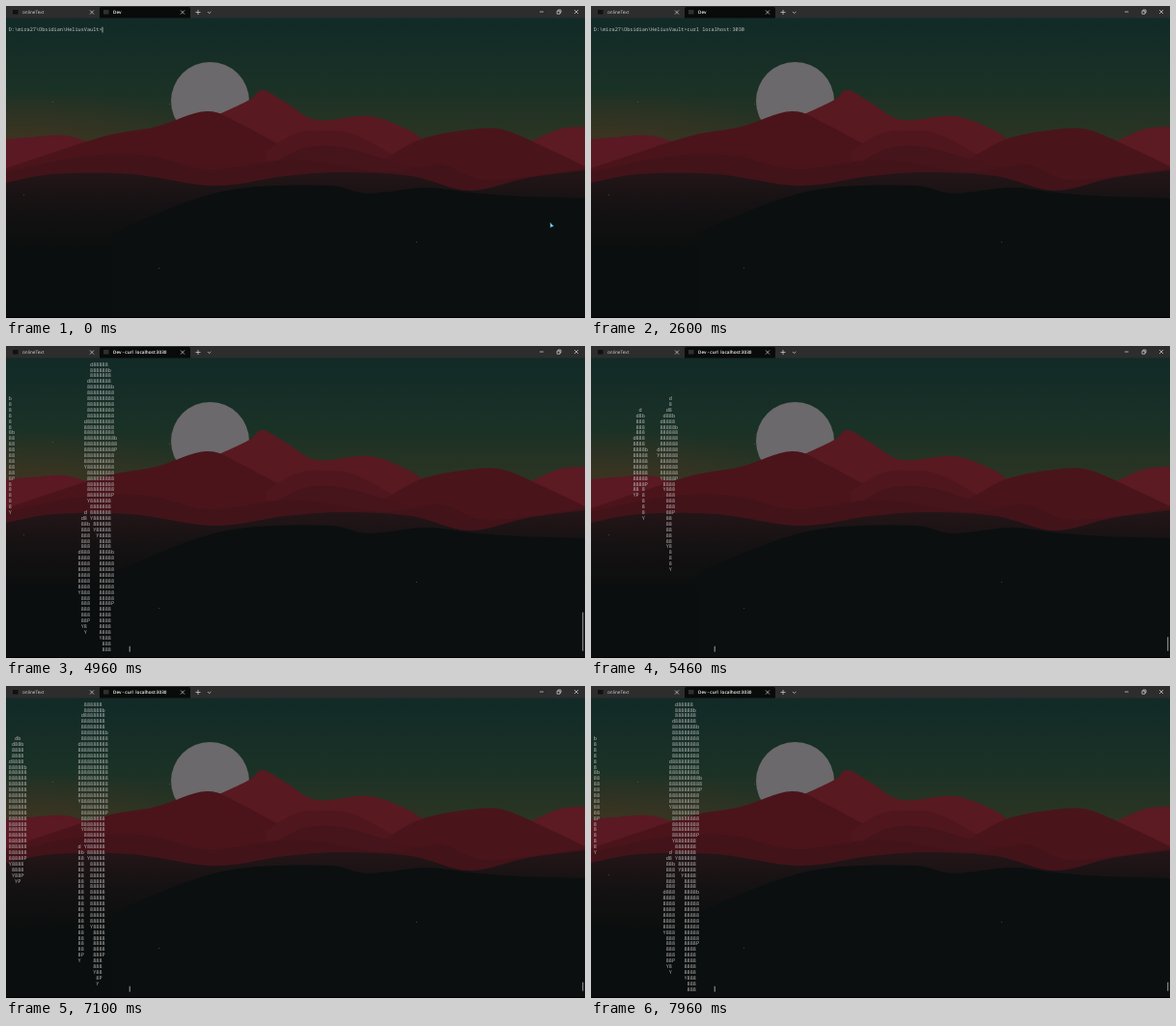
An HTML page that plays this animation: 600 by 323 pixels, repeating every 8000 ms.

```html
<!DOCTYPE html>
<html lang="en">
<head>
<meta charset="utf-8">
<title>Terminal</title>
<style>
  html, body { margin: 0; width: 100%; height: 100%; overflow: hidden; background: #0a0d0d; }
  svg { display: block; width: 100%; height: 100%; }
  text { white-space: pre; text-rendering: geometricPrecision; }
  .mono { font: 5.217px "Noto Sans Mono", "DejaVu Sans Mono", monospace; fill: #c6c6c6; }
  .art { fill: #b8b8b8; }
  .tab { font: 4.65px "Open Sans", "Noto Sans", sans-serif; fill: #d6d6d6; }
  .active { fill: #fff; font-weight: 600; }
  .icon { fill: none; stroke: #d8d8d8; stroke-width: .7; }
</style>
</head>
<body>
<svg viewBox="0 0 600 323" preserveAspectRatio="none">
  <defs>
    <linearGradient id="sky" x2="0" y2="1">
      <stop offset="0" stop-color="#122a27"/>
      <stop offset=".5" stop-color="#193126"/>
      <stop offset="1" stop-color="#2f3522"/>
    </linearGradient>
    <radialGradient id="glow" gradientUnits="userSpaceOnUse" cx="0" cy="0" r="1"
      gradientTransform="translate(15 142) scale(200 55)">
      <stop offset="0" stop-color="#4a3320" stop-opacity=".6"/>
      <stop offset="1" stop-color="#4a3320" stop-opacity="0"/>
    </radialGradient>
    <linearGradient id="earth" gradientUnits="userSpaceOnUse" x1="0" y1="173" x2="0" y2="250">
      <stop offset="0" stop-color="#231517"/>
      <stop offset=".4" stop-color="#161213"/>
      <stop offset="1" stop-color="#0b0e0e"/>
    </linearGradient>
  </defs>
  <rect y="12" width="600" height="138" fill="url(#sky)"/>
  <rect y="12" width="600" height="138" fill="url(#glow)"/>
  <circle cx="211.5" cy="98.5" r="40.5" fill="#6b696b"/>
  <g id="hills"></g>
  <g id="specks" fill="#8a7a66" opacity=".45"></g>
  <rect y="322" width="600" height="1" fill="#000"/>

  <rect width="600" height="12.5" fill="#2d2d2d"/>
  <path d="M97 12.5V2.5Q97 1 98.500 1H189.500Q191 1 191 2.500V12.500Z" fill="#090b0b"/>
  <rect x="7" y="4" width="5.500" height="4.500" fill="#111"/>
  <rect x="101" y="4" width="5.500" height="4.500" fill="#303030"/>
  <text class="tab" x="17" y="8">onlineText</text>
  <text class="tab active" id="title" x="111" y="8"></text>
  <path class="icon" d="M87 4.500l4 4m0-4l-4 4M181 4.500l4 4m0-4l-4 4M196.500 6.500h5m-2.500-2.500v5M209 6l1.700 1.500L212.400 6"/>
  <path class="icon" d="M553 6h4M571 5.200h3v3h-3zM572 5v-1h3v3h-1M589 4l4 4m0-4l-4 4"/>

  <text class="mono" id="prompt" x="2.800" y="26.400"></text>
  <g id="art"></g>
  <rect id="caret" width=".7" height="5.800" fill="#dedede"/>
  <rect id="scroll" x="597.300" width="1" fill="#a5a5a5"/>
  <path id="mouse" d="M564 224.500l.3 5 1.200-1.300 1.900-.2z" fill="#bdf0ff" stroke="#1b8fb5" stroke-width=".6"/>
</svg>
<script>
const $ = id => document.getElementById(id);
const NS = 'http://www.w3.org/2000/svg';
const LOOP = 8000, CELL_W = 3.13, ROW_H = 5.9, COLS = 40, ROWS = 51;
const LEFT = 2.8, TOP = 18.7;
const PROMPT = 'D:\\mira27\\Obsidian\\HeliusVault>';
const COMMAND = 'curl localhost:3030';
const TYPE_START = 600, TYPE_END = 2060, ENTER = 3600, STREAM = 4700, BLINK = 530;

function add(parent, tag, attrs) {
  const el = document.createElementNS(NS, tag);
  for (const k in attrs) el.setAttribute(k, attrs[k]);
  return parent.appendChild(el);
}

// A smooth curve through a few points, filled down to the bottom.
function ridge(fill, points) {
  const p = points.split(' ').map(s => s.split(',').map(Number));
  const at = i => p[Math.max(0, Math.min(p.length - 1, i))];
  const handle = (i, side) => at(i).map((v, n) => v + side * (at(i + 1)[n] - at(i - 1)[n]) / 6);
  let d = `M${p[0][0]},323L${p[0]}`;
  for (let i = 1; i < p.length; i++) d += `C${handle(i - 1, 1)} ${handle(i, -1)} ${p[i]}`;
  add($('hills'), 'path', { d: `${d}V323Z`, fill });
}

ridge('#5a1923', '0,138 25,136 60,134 90,143 140,165');
ridge('#5c1a23', '500,160 546,139 575,127 600,125');
ridge('#591921', '190,125 232,107 254,96 266,87 290,100 322,118 375,114 412,126 434,140 460,165');
ridge('#4b141b', '0,168 45,153 105,134 155,125 208,109 245,123 290,147 340,172');
ridge('#50161d', '270,150 300,132 330,129 366,135 430,172');
ridge('#4a141b', '390,160 430,138 480,128 515,128 560,147 600,166');
ridge('#46141b', '260,176 303,149 346,146 400,161 480,185');
ridge('#43131a', '0,172 78,156 148,155 212,169 300,159 390,172 450,164 500,180 600,168');
ridge('url(#earth)', '0,183 50,174 130,174 215,186 290,176 350,172 420,176 480,191 540,178 600,170');
ridge('#0b0f0f', '110,235 190,202 250,188 335,186 375,194 435,188 480,193 530,197 600,199');

for (const [x, y] of [[48, 99], [169, 101], [18, 195], [425, 244], [158, 271]])
  add($('specks'), 'rect', { x, y, width: 1, height: 1 });

// A pose is three solid ellipses and a hole, each [cx, cy, rx, ry].
const TWIN = [[51, 126, 7, 63], [81, 110, 11, 46], [82, 141, 4, 92], [50, 175, 2, 40]];
const NEAR = [[53, 128, 9, 62], [73, 108, 10, 34], [73, 128, 6, 68], [52, 178, 4, 36]];
const FULL = [[56, 205, 39, 155], [56, 40, 13, 70], [56, 40, 13, 70], [55, 185, 5, 62]];
const SIDE = [[3, 113, 5, 63], [98, 100, 16, 100], [104, 240, 7, 110], [82, 235, -6, 66]];
const DANCE = [TWIN, FULL, NEAR, SIDE, FULL, SIDE];
const BEAT = 500, DOWNBEAT = 5460, STEPS = 6;

const lines = Array.from({ length: ROWS }, (_, r) =>
  add($('art'), 'text', { class: 'mono art', x: LEFT, y: TOP + r * ROW_H + 1.9 }));

function poseAt(t) {
  const beat = (t - DOWNBEAT) / BEAT + DANCE.length, i = Math.floor(beat);
  const u = Math.floor((beat - i) * STEPS) / STEPS;
  const a = DANCE[i % DANCE.length], b = DANCE[(i + 1) % DANCE.length];
  return a.map((e, k) => e.map((v, n) => v + (b[k][n] - v) * u));
}

const within = ([cx, cy, rx, ry], x, y) => ((x - cx) / rx) ** 2 + ((y - cy) / ry) ** 2 < 1;

// A negative rx turns the hole into a fourth solid.
function solid(pose, col, row) {
  const x = LEFT + (col + .5) * CELL_W, y = TOP + row * ROW_H, last = pose[3];
  if (within(last, x, y)) return last[2] < 0;
  return pose.slice(0, 3).some(e => within(e, x, y));
}

function glyph(pose, c, r) {
  if (!solid(pose, c, r)) return ' ';
  const above = solid(pose, c, r - 1), below = solid(pose, c, r + 1);
  if (above && below) return '8';
  if (!solid(pose, c - 1, r)) return above ? 'Y' : 'd';
  if (!solid(pose, c + 1, r)) return above ? 'P' : 'b';
  return '8';
}

function drawArt(t) {
  const pose = t >= STREAM && poseAt(t);
  lines.forEach((el, r) => {
    el.textContent = pose ? Array.from({ length: COLS }, (_, c) => glyph(pose, c, r)).join('') : '';
  });
}

function draw(t) {
  const progress = (t - TYPE_START) / (TYPE_END - TYPE_START);
  const typed = progress < 0 ? 0 : Math.min(COMMAND.length, 1 + Math.floor(progress * (COMMAND.length - 1)));
  const streaming = t >= STREAM;
  $('title').textContent = t < ENTER ? 'Dev' : 'Dev - curl  localhost:3030';
  $('prompt').textContent = streaming ? '' : PROMPT + COMMAND.slice(0, typed);
  $('mouse').style.display = t < TYPE_START ? '' : 'none';

  // The thumb shrinks as the scrollback grows.
  const thumb = streaming ? Math.max(9, Math.min(40, 11000 / (t - STREAM + 1))) : 0;
  $('scroll').setAttribute('y', 315.7 - thumb);
  $('scroll').setAttribute('height', thumb);

  let col = PROMPT.length + typed, row = 1, since = 0;
  if (streaming) [col, row] = [40, 50];
  else if (t >= ENTER) [col, row, since] = [0, 2, t - ENTER];
  else if (t >= TYPE_END) since = t - TYPE_END;
  else if (t < TYPE_START) since = t;
  $('caret').setAttribute('x', LEFT + col * CELL_W - .2);
  $('caret').setAttribute('y', TOP + row * ROW_H - 2.9);
  $('caret').style.display = since % (2 * BLINK) < BLINK ? '' : 'none';
  drawArt(t);
}

const start = performance.now();
function tick() {
  draw((performance.now() - start) % LOOP);
  requestAnimationFrame(tick);
}
tick();
</script>
</body>
</html>
```
